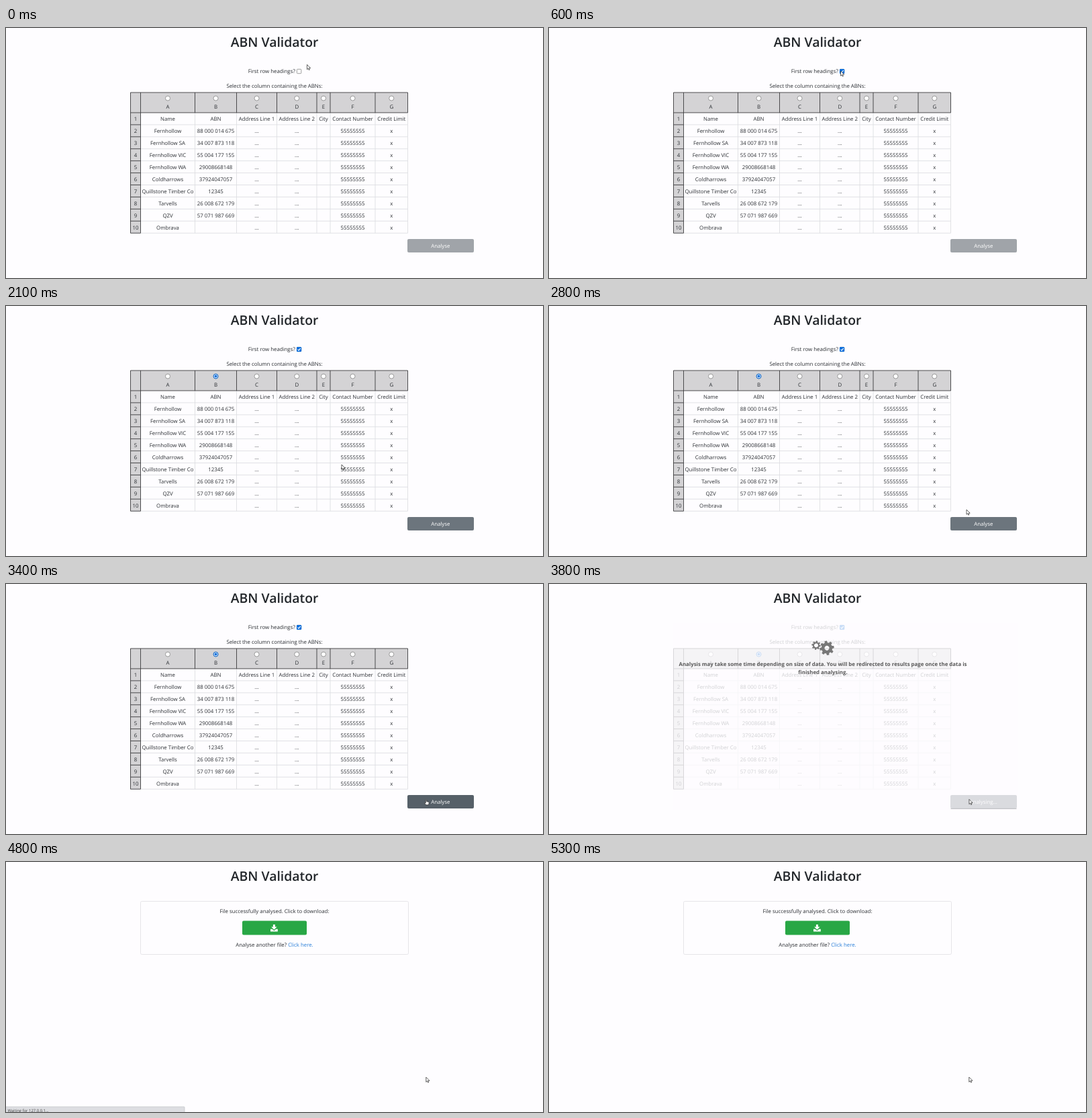
An HTML page for the animation above (5.8 s loop, 800 by 372 pixels).

```html
<!DOCTYPE html>
<html lang="en">
<head>
<meta charset="utf-8">
<title>ABN Validator</title>
<style>
html, body { margin: 0; width: 100%; height: 100%; overflow: hidden; background: #fefdff; }
svg { display: block; width: 800px; height: 372px; }
text { font: 7.85px "Open Sans", "Noto Sans", sans-serif; fill: #2b2f33; text-anchor: middle; text-rendering: geometricPrecision; }
.title { font-size: 19.4px; font-weight: 600; fill: #212529; }
.strong { font-weight: 700; fill: #595959; }
.white { fill: #fff; }
.link { fill: #2a7fd8; }
.status { font-size: 5.9px; text-anchor: start; fill: #444; }
.dark { fill: none; stroke: #3c3c3e; stroke-width: .9; }
.light { fill: none; stroke: #dedfe3; stroke-width: .9; }
.box { fill: #fff; stroke: #767676; stroke-width: .7; }
.on { fill: none; stroke: #0b6fdc; }
</style>
</head>
<body>
<svg id="stage" viewBox="0 0 800 372"></svg>
<script>
const LOOP = 5800, STEP = 100;
const stage = document.getElementById('stage');
const edges = [185.5, 200.5, 281.5, 343.5, 403.5, 463, 483, 550, 598.5];
const top0 = 96, body0 = 126, rowH = 17.92;
const bottom = body0 + 10 * rowH;

const rows = [
  ['Fernhollow', '88 000 014 675'],
  ['Fernhollow SA', '34 007 873 118'],
  ['Fernhollow VIC', '55 004 177 155'],
  ['Fernhollow WA', '29008668148'],
  ['Coldharrows', '37924047057'],
  ['Quillstone Timber Co', '12345'],
  ['Tarvells', '26 008 672 179'],
  ['QZV', '57 071 987 669'],
  ['Ombrava', '']
].map(([name, abn]) => [name, abn, '...', '...', '', '55555555', 'x']);
rows.unshift(['Name', 'ABN', 'Address Line 1', 'Address Line 2', 'City', 'Contact Number', 'Credit Limit']);

// Text vertically centred on y
const label = (x, y, str, cls = '', id = '') =>
  `<text x="${x}" y="${y + 2.8}" class="${cls}" id="${id}">${str}</text>`;
const rect = (x, y, w, h, attrs) => `<rect x="${x}" y="${y}" width="${w}" height="${h}" ${attrs}/>`;
const path = (d, attrs) => `<path d="${d}" ${attrs}/>`;
const mid = col => (edges[col] + edges[col + 1]) / 2;

function table() {
  const right = edges[8];
  let out = rect(edges[0], top0, right - edges[0], body0 - top0, 'fill="#d4d3d5"')
    + rect(edges[0], body0, edges[1] - edges[0], bottom - body0, 'fill="#d4d3d5"');
  let light = '', dark = `M${edges[0]} ${top0}H${right}M${edges[0]} ${body0}H${right}`;
  edges.forEach((x, i) => {
    dark += `M${x} ${top0}V${i < 2 ? bottom : body0}`;
    if (i > 1) light += `M${x} ${body0}V${bottom}`;
  });
  rows.forEach((cells, r) => {
    const y = body0 + (r + 1) * rowH, cy = y - rowH / 2 + .6;
    light += `M${edges[1]} ${y}H${right}`;
    dark += `M${edges[0]} ${y}H${edges[1]}`;
    out += label(mid(0), cy, r + 1);
    cells.forEach((str, c) => { out += label(mid(c + 1), cy, str); });
  });
  out += path(light, 'class="light"') + path(dark, 'class="dark"');
  [...'ABCDEFG'].forEach((letter, c) => {
    out += `<circle cx="${mid(c + 1)}" cy="104.6" r="3.5" class="box"/>` + label(mid(c + 1), 117.6, letter);
  });
  return out;
}

function gear(id, outer, root, hole) {
  const teeth = 8, points = [];
  for (let i = 0; i < teeth; i++) {
    [[-.32, root], [-.2, outer], [.2, outer], [.32, root]].forEach(([offset, r]) => {
      const a = (i + offset) * 2 * Math.PI / teeth;
      points.push(`${(r * Math.cos(a)).toFixed(2)} ${(r * Math.sin(a)).toFixed(2)}`);
    });
  }
  const ring = `M${hole} 0A${hole} ${hole} 0 1 0 ${-hole} 0A${hole} ${hole} 0 1 0 ${hole} 0Z`;
  return path(`M${points.join('L')}Z${ring}`, `id="${id}" fill="#777" fill-rule="evenodd"`);
}

const form = `<g id="form">
  ${label(395.7, 64.6, 'First row headings?')}
  ${rect(433.4, 61.3, 6.4, 6.4, 'rx="1" class="box"')}
  <g id="check">${rect(433, 61, 7.1, 7.1, 'rx="1.1" fill="#0b6fdc"')}
    ${path('M434.5 64.7l1.5 1.5 2.8-3.4', 'fill="none" stroke="#fff" stroke-width="1.1"')}</g>
  ${label(400, 85.7, 'Select the column containing the ABNs:')}
  ${table()}
  <g id="radio"><circle cx="${mid(2)}" cy="104.6" r="3.4" class="on"/>
    <circle cx="${mid(2)}" cy="104.6" r="2" fill="#0b6fdc"/></g>
  ${rect(598, 314, 99, 20, 'rx="2" id="button"')}
  ${label(647.3, 324.2, 'Analyse', 'white', 'caption')}
</g>`;

const overlay = `<g id="overlay">
  ${rect(184, 58, 515, 278, 'fill="#fefdff" opacity=".79"')}
  ${path('M598.5 334.3H696.5', 'stroke="#b4b7b9"')}
  <g transform="translate(398 91.3)">${gear('small', 6.8, 5, 2.9)}</g>
  <g transform="translate(414 95.3)">${gear('big', 10.8, 8.2, 3.4)}</g>
  ${label(408, 119, 'Analysis may take some time depending on size of data. You will be redirected to results page once the data is', 'strong')}
  ${label(408, 131.4, 'finished analysing.', 'strong')}
</g>`;

const result = `<g id="result">
  ${rect(200.5, 58.5, 399, 79, 'rx="2" fill="#fefdff" stroke="#e6e5e9"')}
  ${label(400, 73.5, 'File successfully analysed. Click to download:')}
  ${rect(352, 87.5, 96, 21, 'rx="2" fill="#28a745"')}
  ${path('M397.9 93h3v3.6h2.7l-4.2 4.2-4.2-4.2h2.7zM394 99.8h2.6l2.8 2.4 2.8-2.4h2.6v3.6h-10.8z', 'fill="#fff"')}
  ${label(400, 123.5, 'Analyse another file? <tspan class="link">Click here.</tspan>')}
</g>`;

const status = `<g id="status">
  ${rect(-1, 364.2, 267, 9, 'rx="1" fill="#dddee2" stroke="#bfc0c4" stroke-width=".7"')}
  ${label(2.5, 369.3, 'Waiting for 127.0.0.1...', 'status')}
</g>`;

const outline = 'fill="#fff" stroke="#222" stroke-width=".7" stroke-linejoin="round"';
const cursor = `<g id="cursor">
  ${path('M0 0V7.2L1.7 5.7 2.8 8.1 3.9 7.6 2.9 5.3 5.2 5.2Z', `id="arrow" ${outline}`)}
  ${path('M-.7 .6Q0-.4 .7 .6V3.2L3.4 3.7Q4.4 4 4.2 5.2L3.6 8.3H-.4L-2.4 5.3Q-2.3 4.3-.7 5.3Z', `id="hand" ${outline}`)}
</g>`;

stage.innerHTML = label(400, 25.2, 'ABN Validator', 'title') + form + overlay + result + status + cursor;

const part = {};
stage.querySelectorAll('[id]').forEach(el => { if (el.id) part[el.id] = el; });
const fade = (el, opacity) => el.setAttribute('opacity', opacity);
const ramp = (t, from, to) => Math.min(1, Math.max(0, (t - from) / (to - from)));

// Pointer route: time, x, y
const route = [
  [0, 448.5, 54.5], [400, 436, 63], [600, 434.5, 64], [800, 434.5, 64],
  [900, 330, 118], [1000, 296, 130], [1200, 296, 130], [1300, 296, 128],
  [1600, 307, 111], [1800, 311.5, 104], [1900, 313, 105], [2000, 380, 158],
  [2100, 500, 236], [2200, 590, 288], [2300, 619, 301], [2500, 621, 302],
  [2800, 622, 303], [3000, 625, 315], [3100, 626, 320.5], [LOOP, 625.7, 320]
];

function pointer(t) {
  const i = route.findIndex(stop => stop[0] > t);
  const [t0, x0, y0] = route[i - 1], [t1, x1, y1] = route[i];
  const k = (t - t0) / (t1 - t0);
  return [x0 + (x1 - x0) * k, y0 + (y1 - y0) * k];
}

function draw(t) {
  const done = t >= 4800, hover = t >= 3100, hand = hover && t < 3600;
  fade(part.form, done ? 0 : 1);
  fade(part.result, done ? 1 : 0);
  fade(part.check, t >= 500 ? 1 : 0);
  fade(part.radio, t >= 1900 ? 1 : 0);
  part.button.setAttribute('fill', t < 1900 ? '#a0a4a9' : hover ? '#566068' : '#6c757d');
  part.caption.textContent = t < 3500 ? 'Analyse' : 'Analysing...';
  fade(part.overlay, done ? 0 : ramp(t, 3400, 3600));
  const spin = (Math.min(t, 4500) - 3400) * .09;
  part.big.setAttribute('transform', `rotate(${spin})`);
  part.small.setAttribute('transform', `rotate(${-spin})`);
  fade(part.status, ramp(t, 4000, 4200) - ramp(t, 5000, 5300));
  fade(part.arrow, hand ? 0 : 1);
  fade(part.hand, hand ? 1 : 0);
  part.cursor.setAttribute('transform', `translate(${pointer(t)})`);
}

const start = performance.now();
function tick() {
  const t = (performance.now() - start) % LOOP;
  draw(Math.floor(t / STEP) * STEP);
  requestAnimationFrame(tick);
}
tick();
</script>
</body>
</html>
```
